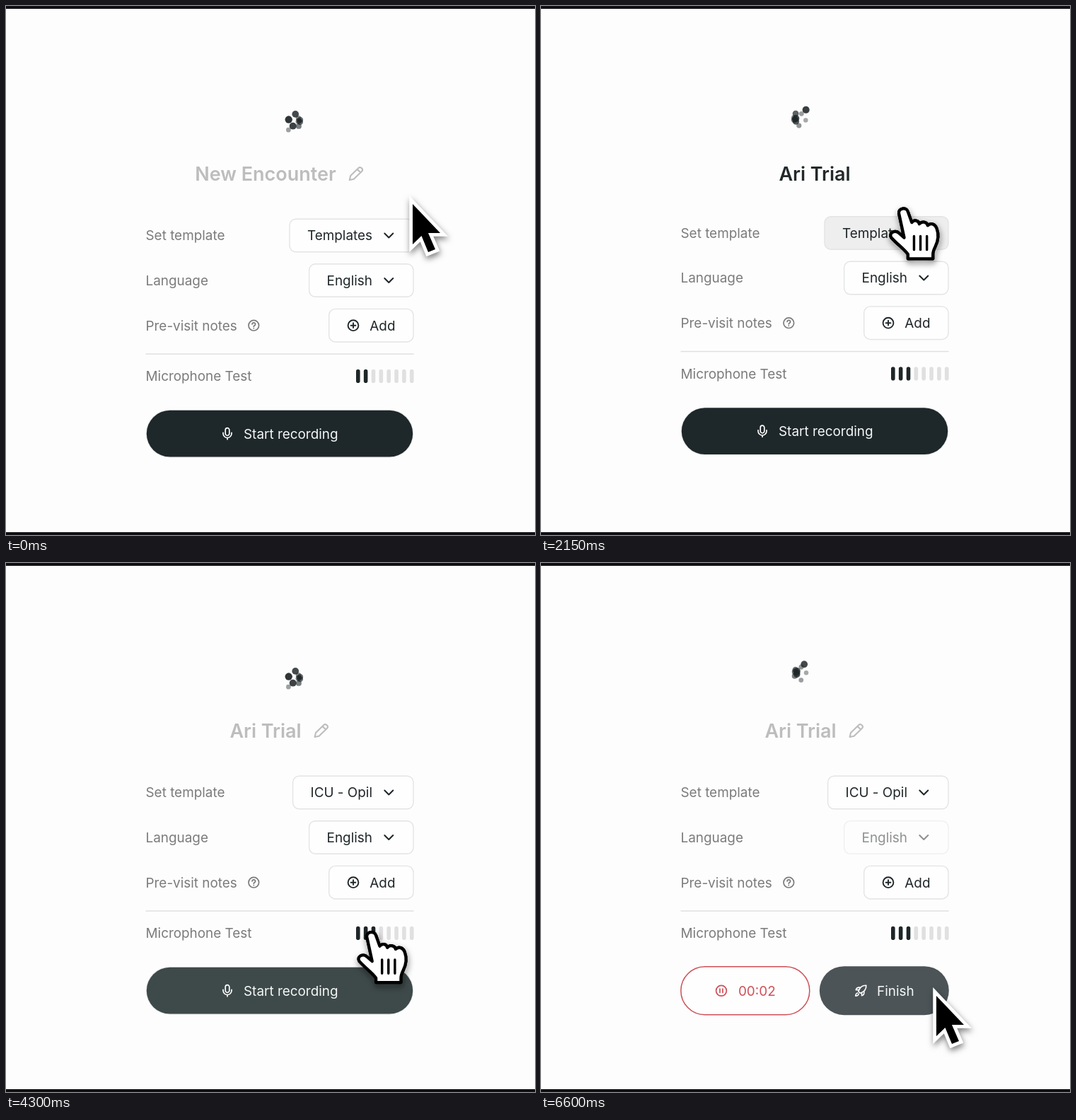
Write an HTML page with a canvas that moves like this. It is 748 px wide and 748 px high and loops after 6650 ms.

```html
<!DOCTYPE html>
<html lang="en">
<head>
<meta charset="utf-8">
<title>New Encounter</title>
<style>
html, body { margin: 0; width: 100%; height: 100%; overflow: hidden; background: #fdfdfd; }
canvas { display: block; width: 100vw; height: 100vh; }
</style>
</head>
<body>
<canvas id="stage" width="748" height="748"></canvas>
<script>
const g = document.getElementById('stage').getContext('2d');
const LOOP = 6650, STEP = 50, SPIN = 4300;
const EDIT = 600, OPEN = 2400, PICK = 3650, RECORD = 4350;
const INK = '#1f2628', LABEL = '#7b7b7b', PALE = '#bdbdbd', LINE = '#e3e4e4', RED = '#cd5057';
const BODY = 18.9, TITLE = 27, SMALL = 13.5;
const PATIENT = 'Ari Trial', CHOICE = 'ICU - Opil';
const ITEMS = [CHOICE, 'Corvane - Inpatient', 'Resident Weight Loss H&P', 'H&P (QELO)'];

// pointer moves: start, end, x, y
const ORIGIN = [569, 270];
const MOVES = [
  [0, 550, 434, 237],
  [1750, 2300, 530, 298],
  [2600, 3400, 520, 426],
  [3750, 4500, 516, 543],
  [4600, 5200, 553, 602]
];

const clamp = v => Math.max(0, Math.min(1, v));
const ease = v => v * v * (3 - 2 * v);
const font = (size, weight) => `${weight} ${size}px Inter, sans-serif`;

function text(str, x, y, color, align = 'left', size = BODY, weight = 400) {
  g.font = font(size, weight);
  g.textAlign = align;
  g.fillStyle = color;
  g.fillText(str, x, y + size * 0.36);
}

function widthOf(str, size = BODY, weight = 400) {
  g.font = font(size, weight);
  return g.measureText(str).width;
}

function box(x, y, w, h, r, fill, stroke, line = 1.4) {
  g.beginPath();
  g.roundRect(x, y, w, h, r);
  if (fill) { g.fillStyle = fill; g.fill(); }
  if (stroke) { g.strokeStyle = stroke; g.lineWidth = line; g.stroke(); }
}

function icon(x, y, path, color, line = 1.7) {
  g.save();
  g.translate(x, y);
  g.strokeStyle = color;
  g.lineWidth = line;
  g.lineCap = g.lineJoin = 'round';
  g.stroke(new Path2D(path));
  g.restore();
}

const ring = r => `M${r} 0A${r} ${r} 0 1 1 ${-r} 0A${r} ${r} 0 1 1 ${r} 0`;
const ICONS = {
  chevron: 'M-6 -3L0 3L6 -3',
  plus: ring(7.4) + 'M-3.4 0H3.4M0 -3.4V3.4',
  help: ring(7.3) + 'M-2.2 -1.7C-2 -4.6 2.4 -4.4 2.3 -1.6C2.2 0 0 0 0 1.6M0 3.9V4',
  pause: ring(7.4) + 'M-2 -2.6V2.6M2 -2.6V2.6',
  mic: 'M-2.8 -5A2.8 2.8 0 0 1 2.8 -5V0A2.8 2.8 0 0 1 -2.8 0ZM-6 -1.2V0A6 6 0 0 0 6 0V-1.2M0 6V8.3',
  pencil: 'M-9 9L-7.6 3L4 -8.2C6.5 -10.5 11 -6 8.6 -3.6L-3 7.8ZM2 -6L6.5 -1.5',
  rocket: 'M-3.5 1C-1.5 -5 2 -7.8 7.5 -7.5C7.8 -2 5 1.5 -1 3.5ZM-3 -1.2H-7C-6 -4.5 -4 -5 -1 -4.5' +
    'M1.2 3V7C4.5 6 5 4 4.5 1M-4.5 3.2C-6.5 3.5 -7.3 5 -7.5 7.5C-5 7.3 -3.5 6.5 -3.2 4.5'
};

function pointer(t) {
  let [x, y] = ORIGIN;
  for (const [from, to, nx, ny] of MOVES) {
    const k = ease(clamp((t - from) / (to - from)));
    x += (nx - x) * k;
    y += (ny - y) * k;
  }
  return [x, y];
}

// dots circle the surface of a sphere, each on its own tilted orbit
function orbit(i, t) {
  const a = i * 3.9 + t / SPIN * 2 * Math.PI;
  const axis = i * 2.4, tilt = (i * 0.618 + 0.2) % 1;
  const u = Math.cos(a), v = Math.sin(a) * tilt;
  return {
    x: 387 + 29 * (u * Math.cos(axis) - v * Math.sin(axis)),
    y: 161 + 29 * (u * Math.sin(axis) + v * Math.cos(axis)),
    depth: Math.sin(a) * Math.sqrt(1 - tilt * tilt)
  };
}

function drawDots(t) {
  const dots = Array.from({ length: 10 }, (_, i) => orbit(i, t)).sort((p, q) => p.depth - q.depth);
  for (const { x, y, depth } of dots) {
    g.globalAlpha = 0.66 + 0.3 * depth;
    g.fillStyle = INK;
    g.beginPath();
    g.arc(x, y, 4.2 + 1.1 * depth, 0, 7);
    g.fill();
  }
  g.globalAlpha = 1;
}

function drawTitle(t) {
  const y = 237, weight = 600;
  const typed = Math.floor((t - 900) / 95);
  const name = typed > 0 ? PATIENT.slice(0, typed) : 'New Encounter';
  const w = widthOf(name, TITLE, weight);
  if (t >= EDIT && t < OPEN) {
    if (typed <= 0) box(387 - w / 2, 221.5, w, 31, 0, '#b2d1fb');
    text(name, 387, y, typed > 0 ? '#23292b' : '#233440', 'center', TITLE, weight);
  } else {
    const x = 386 - (w + 38) / 2;
    text(name, x, y, PALE, 'left', TITLE, weight);
    icon(x + w + 28, y, ICONS.pencil, PALE, 2.1);
  }
}

function select(label, y, fill) {
  const w = widthOf(label);
  box(518 - w - 25, y - 23.3, w + 83, 46.6, 9, fill, LINE);
  text(label, 518, y, INK, 'right');
  icon(541.3, y, ICONS.chevron, INK, 2);
}

function drawMeter(t) {
  const level = Math.round(3 - 0.9 * Math.cos(2 * Math.PI * t / 587));
  for (let i = 0; i < 8; i++) {
    box(495 + i * 10.85, 513.8, 5.6, 19.2, 2.8, i < level ? INK : '#e0e0e0');
  }
}

function drawForm(t) {
  const recording = t >= RECORD;
  text('Set template', 197.5, 324.5, LABEL);
  select(t < PICK ? 'Templates' : CHOICE, 324.5, t >= 2100 && t < 2600 ? '#eeeeee' : '#fefefe');

  text('Language', 197.5, 388, LABEL);
  g.globalAlpha = recording ? 0.5 : 1;
  select('English', 388, '#fefefe');
  g.globalAlpha = 1;

  text('Pre-visit notes', 197.5, 451.7, LABEL);
  icon(350.3, 451.7, ICONS.help, LABEL);
  box(456.7, 428.4, 119.3, 46.6, 9, '#fefefe', LINE);
  icon(491, 451.7, ICONS.plus, INK, 1.9);
  text('Add', 550.5, 451.7, INK, 'right');

  box(197.5, 491.3, 379, 1.5, 0, '#e0e0e0');
  text('Microphone Test', 197.5, 523.5, LABEL);
  drawMeter(t);
  recording ? drawRecorder(t) : drawStart(t);
}

function drawStart(t) {
  box(198, 571, 378, 67.4, 33.7, '#dfe2e2');
  box(198.8, 571.8, 376.4, 65.8, 32.9, t >= 4200 ? '#3e4949' : '#1e2729');
  icon(313, 604.5, ICONS.mic, '#fff');
  text('Start recording', 336, 604.8, '#f6f8f8');
}

function drawRecorder(t) {
  const clock = '00:0' + Math.floor((t - RECORD) / 975);
  const w = widthOf(clock);
  const x = 289.3 - (w + 32) / 2;
  box(197.8, 570.8, 182, 68, 34, '#fefefe', RED, 1.5);
  icon(x + 8, 604.8, ICONS.pause, RED);
  text(clock, x + 32, 604.8, RED);
  box(393.8, 570.2, 183, 69, 34.5, '#4c5457');
  icon(452.3, 604.8, ICONS.rocket, '#fff', 1.6);
  text('Finish', 475, 604.8, '#f6f8f8');
}

function shadow(color, blur, x, y) {
  g.shadowColor = color;
  g.shadowBlur = blur;
  g.shadowOffsetX = x;
  g.shadowOffsetY = y;
}

function drawMenu(t) {
  g.save();
  g.globalAlpha = clamp((t - OPEN) / 150);
  g.save();
  shadow('rgba(0,0,0,.12)', 12, 0, 2);
  box(252, 363.5, 323.5, 254.8, 8, '#fefefe');
  g.restore();
  box(252, 363.5, 323.5, 254.8, 8, null, LINE, 1);
  text('TEMPLATES', 280, 396, '#777', 'left', SMALL, 500);
  ITEMS.forEach((item, i) => text(item, 280, 442.3 + i * 50.1, LABEL));
  g.restore();
}

const ARROW = new Path2D('M6 10V67L18.5 55L28 78L38 74L28 51H45Z');
const HAND = new Path2D('M-6 6C-7 -1 4 -3 6 4L11 18C14 14 20 15 21 20C24 16 31 17 32 22' +
  'C36 18 42 20 44 26C47 34 46 42 42 50C40 54 39 56 39 60V66H6V60C0 52 -8 47 -16 38' +
  'C-20 32 -11 27 -6 32L1 38Z');
const KNUCKLES = new Path2D('M14 36V54M22.5 36V54M31 36V54');

function drawArrow() {
  g.lineJoin = 'miter';
  g.lineWidth = 9.5;
  g.strokeStyle = '#fff';
  g.save();
  shadow('rgba(0,0,0,.5)', 8, 1, 4);
  g.stroke(ARROW);
  g.restore();
  g.fillStyle = '#000';
  g.fill(ARROW);
}

function drawHand(t) {
  const press = Math.max(...[700, OPEN, PICK].map(c => clamp(1 - Math.abs(t - c) / 150)));
  const size = 1.07 - 0.1 * press;
  g.scale(size, size);
  g.lineJoin = g.lineCap = 'round';
  g.strokeStyle = '#000';
  g.lineWidth = 4;
  g.save();
  shadow('rgba(0,0,0,.6)', 8, 1, 4);
  g.stroke(HAND);
  g.restore();
  g.fillStyle = '#fff';
  g.fill(HAND);
  g.stroke(HAND);
  g.lineWidth = 3.2;
  g.stroke(KNUCKLES);
}

function drawPointer(t) {
  g.save();
  g.translate(...pointer(t));
  t < 350 || t >= RECORD + 150 ? drawArrow() : drawHand(t);
  g.restore();
}

function draw(t) {
  g.fillStyle = '#fdfdfd';
  g.fillRect(0, 0, 748, 748);
  drawDots(t);
  drawTitle(t);
  g.save();
  if (t >= EDIT && t < OPEN) g.translate(0, -3.5);
  drawForm(t);
  g.restore();
  if (t >= OPEN && t < PICK) drawMenu(t);
  drawPointer(t);
  g.fillStyle = '#100f14';
  g.fillRect(0, 0, 748, 4);
  g.fillRect(0, 744, 748, 4);
}

const start = performance.now();
function tick() {
  const t = (performance.now() - start) % LOOP;
  draw(Math.floor(t / STEP) * STEP);
  requestAnimationFrame(tick);
}
tick();
</script>
</body>
</html>
```
